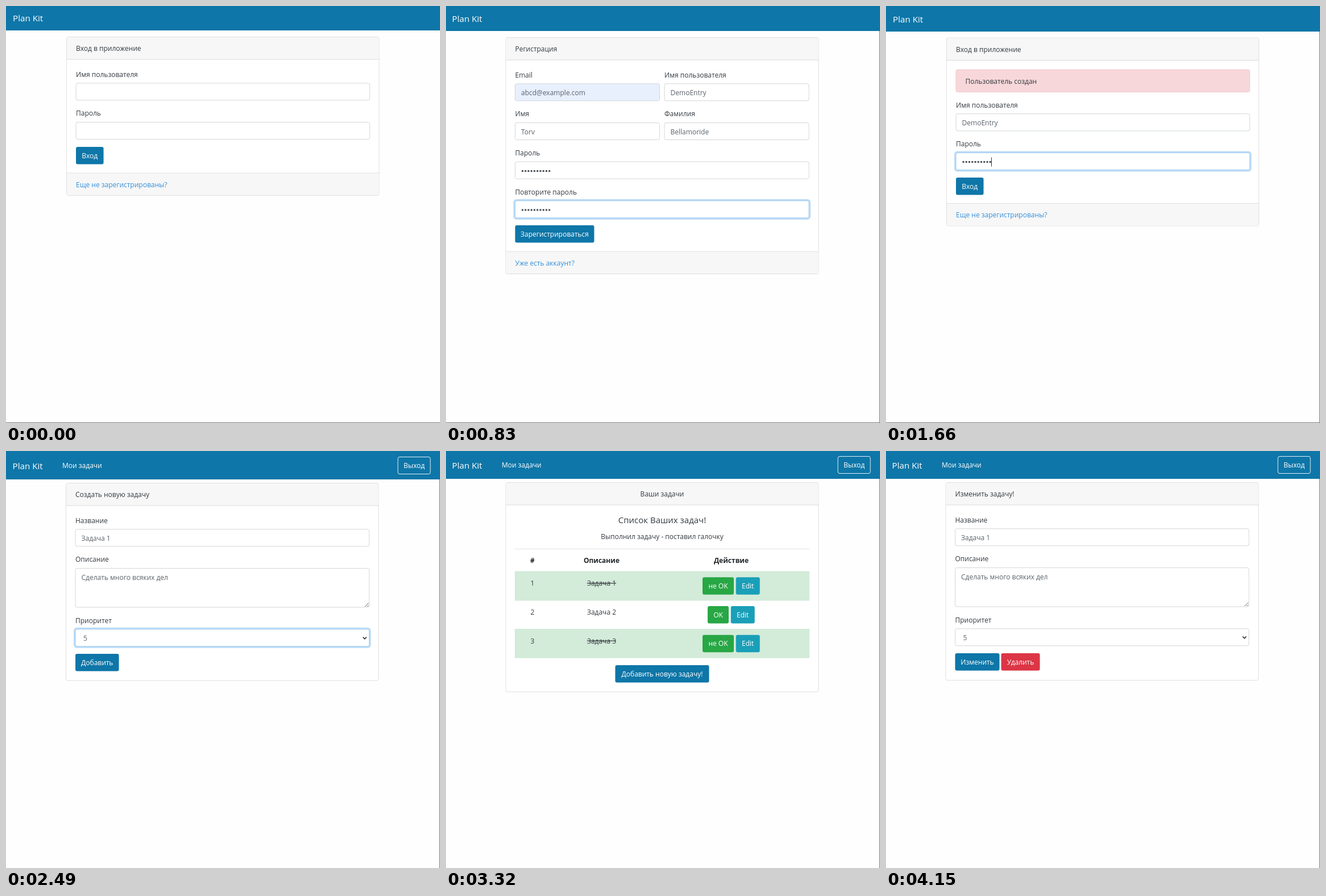
An HTML page for the animation above (4.98 s loop, 763x734 px).

```html
<!DOCTYPE html>
<html lang="ru">
<head>
<meta charset="utf-8">
<title>Plan Kit</title>
<style>
html, body { margin: 0; width: 100%; height: 100%; overflow: hidden; background: #fefefe; }
svg { display: block; width: 763px; height: 734px; font: 12px "Open Sans", "Noto Sans", sans-serif; }
text { fill: #343a40; white-space: pre; }
.mid { text-anchor: middle; }
.light { fill: #fff; }
.link { fill: #3490dc; }
.value { fill: #5b636a; }
.brand { font-size: 15.2px; fill: #fff; }
.title { font-size: 15px; font-weight: 500; }
.bold { font-weight: 700; fill: #212529; }
.done { text-decoration: line-through; }
.scene { visibility: hidden; animation: show 4980ms step-end infinite; }
@keyframes show {
  0% { visibility: visible; }
  16.6667%, 100% { visibility: hidden; }
}
</style>
</head>
<body>
<svg id="stage" viewBox="0 0 763 734"></svg>
<script>
const BLUE = '#0e76a8', GREEN = '#28a745', TEAL = '#1a9fb8', RED = '#dc3545';
const STEP = 830, COUNT = 6;
const PAD = 16.5, WIDE = 516.5, PITCH = 68.7, FIELD = 30;

const text = (x, y, s, cls = '') => `<text x="${x}" y="${y}" class="${cls}">${s}</text>`;
const rect = (x, y, w, h, fill, stroke = 'none', r = 0) =>
  `<rect x="${x}" y="${y}" width="${w}" height="${h}" fill="${fill}" stroke="${stroke}" rx="${r}"/>`;
const path = (d, stroke, width = 1) => `<path d="${d}" fill="none" stroke="${stroke}" stroke-width="${width}"/>`;

const nav = (h, x, y, links = false) => rect(0, 0, 763, h, BLUE) + text(x, y, 'Plan Kit', 'brand') +
  (links ? text(x + 87.5, y - 1.5, 'Мои задачи', 'light') +
    rect(689, h - 39.5, 57, 30, 'none', '#e4f0f6', 3) + text(717.5, y - 1.5, 'Выход', 'light mid') : '');

const button = (x, y, w, s, fill = BLUE) => rect(x, y, w, 30.5, fill, 'none', 3) +
  text(x + w / 2, y + 19.7, s, 'light mid');

const box = (x, y, w, h = FIELD, focus = false, fill = '#fff') =>
  (focus ? `<rect x="${x - 1.5}" y="${y - 1.5}" width="${w + 3}" height="${h + 3}" rx="4" fill="none" stroke="#bbdcf7" stroke-width="3"/>` : '') +
  rect(x, y, w, h, fill, focus ? '#a1cbef' : '#d2d6da', 3);

// All form coordinates are relative to the card's top left corner.
const field = (y, label, value = '', { x = PAD, w = WIDE, h, focus, fill } = {}) =>
  text(x, y, label) + box(x, y + 11.3, w, h, focus, fill) + text(x + 10.5, y + 31.5, value, 'value');

const dots = (y, x = PAD + 13) => Array.from({ length: 10 }, (_, i) =>
  `<circle cx="${x + i * 5.25}" cy="${y}" r="1.75" fill="#495057"/>`).join('');

const card = (x, y, w, h, head, body, { foot = '', center = false } = {}) =>
  `<g transform="translate(${x} ${y})">` + rect(0, 0, w, h, '#fff', '#dfdfdf', 3) +
  rect(.5, .5, w - 1, 39, '#f7f7f7', 'none', 2.5) + path(`M0 39.5H${w}`, '#dadada') +
  text(center ? w / 2 : PAD, 24.5, head, center ? 'mid' : '') +
  (foot ? rect(.5, h - 39, w - 1, 38.5, '#f7f7f7', 'none', 2.5) + path(`M0 ${h - 39.5}H${w}`, '#dfdfdf') +
    text(PAD, h - 15, foot, 'link') : '') + body + '</g>';

const edge = (top, bottom) =>
  (top ? path(`M762.5 ${top}V734`, '#777') : '') + (bottom ? path('M0 733.5H763', '#777') : '');

const half = { w: 254 }, right = { x: 279, w: 254 };
const Y1 = 70, Y2 = Y1 + PITCH, Y3 = Y2 + PITCH, Y4 = Y3 + PITCH;

const login = () => nav(43, 12, 27) + card(106.5, 54.5, 549.5, 279, 'Вход в приложение',
  field(Y1, 'Имя пользователя') + field(Y2, 'Пароль') + button(PAD, 193.5, 48.5, 'Вход'),
  { foot: 'Еще не зарегистрированы?' }) + edge(0, true);

const register = () => nav(44, 10.5, 27.5) + card(105, 55.5, 550, 416, 'Регистрация',
  field(Y1, 'Email', 'abcd@example.com', { ...half, fill: '#e8f0fe' }) +
  field(Y1, 'Имя пользователя', 'DemoEntry', right) +
  field(Y2, 'Имя', 'Torv', half) + field(Y2, 'Фамилия', 'Bellamoride', right) +
  field(Y3, 'Пароль') + dots(Y3 + 27.5) +
  field(Y4, 'Повторите пароль', '', { focus: true }) + dots(Y4 + 27.5) +
  button(PAD, 330.5, 139, 'Зарегистрироваться'), { foot: 'Уже есть аккаунт?' }) + edge(44, true);

const created = () => nav(45, 12, 28.5) + card(106.5, 56, 549, 331, 'Вход в приложение',
  rect(PAD, 56, WIDE, 39.5, '#f8d7da', '#f3c9ce', 3) + text(33, 80.5, 'Пользователь создан') +
  field(122.5, 'Имя пользователя', 'DemoEntry') + field(191.2, 'Пароль', '', { focus: true }) +
  dots(218.5) + path('M79 210.5V226.5', '#333') + button(PAD, 246, 48.5, 'Вход'),
  { foot: 'Еще не зарегистрированы?' }) + edge(45, true);

const taskForm = focus => field(Y1, 'Название', 'Задача 1') +
  field(Y2, 'Описание', '', { h: 68.5 }) + text(PAD + 10.5, Y2 + 31.5, 'Сделать много всяких дел', 'value') +
  path('M525.5 217.5l6.5-6.5M529.5 217.5l2.5-2.5', '#666') +
  field(246, 'Приоритет', '', { focus }) + text(30.5, 277.5, '5', 'value') +
  path('M522 271l3.2 3.2 3.2-3.2', '#343a40', 1.7);

const create = () => nav(50, 11.5, 31.5, true) + card(105.5, 56.5, 549.5, 347.5, 'Создать новую задачу',
  taskForm(true) + button(PAD, 300.5, 76.5, 'Добавить'), {}) + edge(50);

const row = (y, h, n, done) => {
  const w = done ? 55 : 37, x = done ? 346 : 355;
  return (done ? rect(16, y, 518, h, '#d3ebd9') : '') + text(47, y + 25.5, n, 'mid') +
    text(168.5, y + 25.5, 'Задача ' + n, done ? 'mid done' : 'mid') +
    button(x, y + 10.7, w, done ? 'не OK' : 'OK', GREEN) + button(x + w + 3.7, y + 10.7, 42, 'Edit', TEAL);
};

const list = () => nav(49, 10.5, 30.5, true) + card(105, 55.5, 550, 368.5, 'Ваши задачи',
  text(275, 71.5, 'Список Ваших задач!', 'title mid') +
  text(275, 99, 'Выполнил задачу - поставил галочку', 'mid') + path('M16 117H534', '#dee2e6') +
  text(47, 141.5, '#', 'bold mid') + text(168.5, 141.5, 'Описание', 'bold mid') +
  text(396.5, 141.5, 'Действие', 'bold mid') +
  row(156, 52, 1, true) + row(206.7, 50.5, 2, false) + row(257.5, 51.5, 3, true) +
  button(192.5, 321.5, 165, 'Добавить новую задачу!'), { center: true }) + edge(49);

const edit = () => nav(49, 10.5, 30.5, true) + card(105, 55.5, 550, 348, 'Изменить задачу!',
  taskForm(false) + button(PAD, 300.5, 78, 'Изменить') + button(97.5, 300.5, 68, 'Удалить', RED)) + edge(49);

document.getElementById('stage').innerHTML = [login, register, created, create, list, edit]
  .map((scene, i) => `<g class="scene" style="animation-delay:${(i - COUNT) * STEP}ms">` +
    rect(0, 0, 763, 734, '#fefefe') + scene() + '</g>').join('');
</script>
</body>
</html>
```
